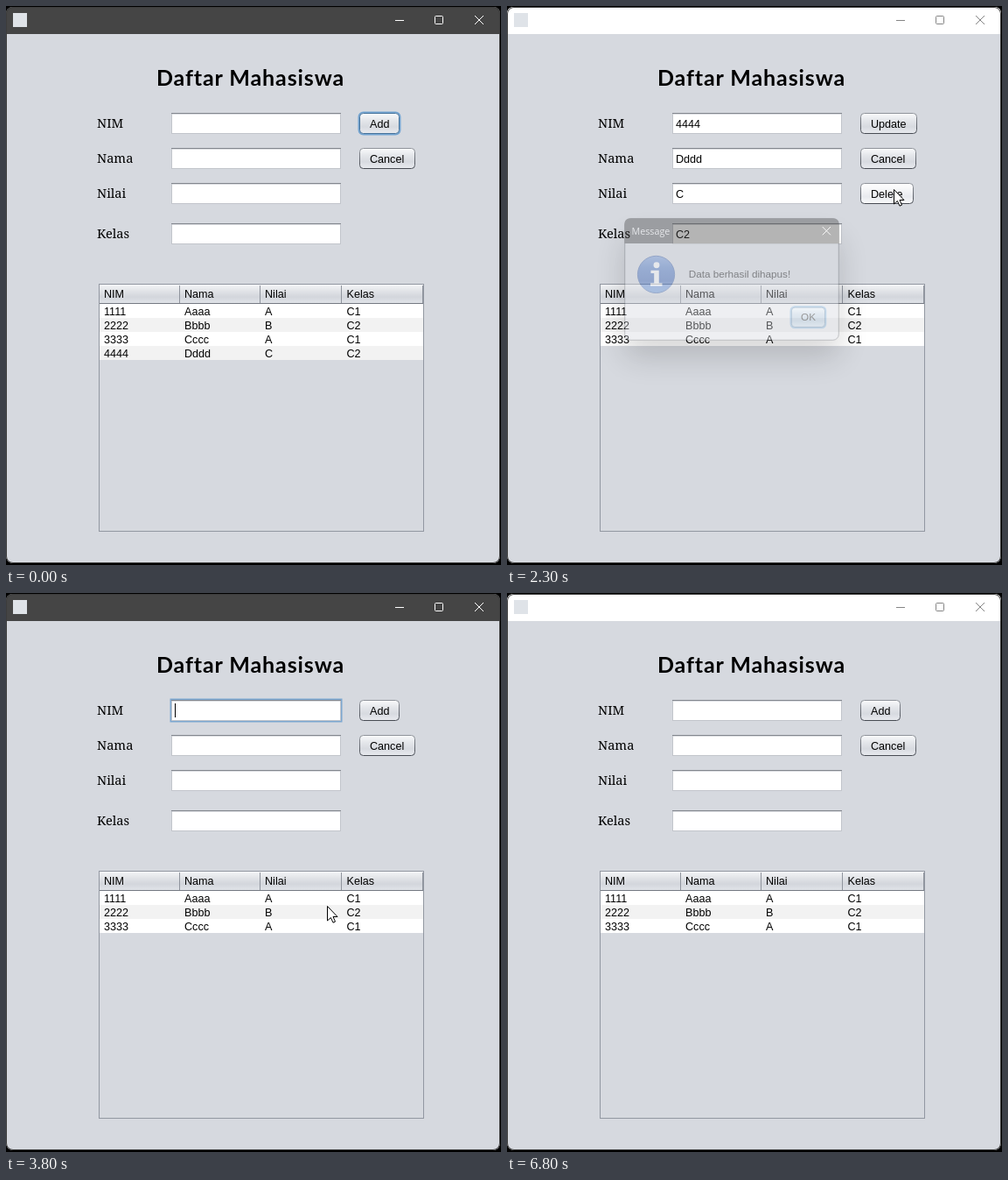
Animation of 566 by 638 pixels, one loop 7 s. Source, as an HTML page:

```html
<!DOCTYPE html>
<html lang="id">
<head>
<meta charset="utf-8">
<title>Daftar Mahasiswa</title>
<style>
  html, body { margin: 0; width: 100%; height: 100%; overflow: hidden; background: #000; }
  svg { display: block; }
  text { font: 12.6px "Liberation Sans", Arial, sans-serif; fill: #000; white-space: pre; }
  .title { font: 700 25px Lato, "Open Sans", sans-serif; letter-spacing: .9px; }
  .label { font: 14.6px "Noto Serif", serif; }
  .caption { font: 11.5px "Open Sans", sans-serif; fill: #fff; }
  .line { fill: none; stroke-width: 1; }
</style>
</head>
<body>
<svg id="stage" width="566" height="638" viewBox="0 0 566 638"></svg>
<script>
const LOOP = 7000, STEP = 100;

// Pointer path: time, x, y (no position hides it)
const PATH = [
  [0], [100, 464, 407], [200, 425, 405], [300, 370, 402], [400, 312, 398],
  [500, 268, 396], [600, 262, 396], [700, 266, 396], [800, 272, 396],
  [1000, 364, 371], [1100, 402, 318], [1200, 432, 254], [1300, 444, 207],
  [1400, 446, 184], [1500, 445, 192], [1600, 443, 204], [1700, 442, 208],
  [1800, 442, 209], [2800, 438, 222], [2900, 424, 260], [3000, 404, 310],
  [3100, 388, 342], [3200, 378, 353], [3300, 368, 357], [3400, 367, 357],
  [5400, 379, 354], [6000, 500, 530], [6100]
];

// Dialog: time, opacity, scale
const DIALOG = [[0, 0, 1], [2300, .4, .93], [2400, .85, .98], [2500, 1, 1], [3600, .5, .95], [3700, 0, 1]];

const STUDENTS = [
  ['1111', 'Aaaa', 'A', 'C1'], ['2222', 'Bbbb', 'B', 'C2'],
  ['3333', 'Cccc', 'A', 'C1'], ['4444', 'Dddd', 'C', 'C2']
];
const HEADS = ['NIM', 'Nama', 'Nilai', 'Kelas'];
const COLS = [107, 199, 291, 384, 477];
const TEXT_X = [112, 204, 296, 389.5];
const FIELD_Y = [122, 162, 202, 248];

const at = (table, t) => table.filter(row => row[0] <= t).pop();
const within = (t, a, b) => t >= a && t < b;

const rect = (x, y, w, h, fill, more = '') =>
  `<rect x="${x}" y="${y}" width="${w}" height="${h}" fill="${fill}" ${more}/>`;
const text = (x, y, s, more = '') => `<text x="${x}" y="${y}" ${more}>${s}</text>`;
const path = (d, color, more = '') => `<path d="${d}" class="line" stroke="${color}" ${more}/>`;
const gradient = (id, ...colors) =>
  `<linearGradient id="${id}" x2="0" y2="1">${colors.map((c, i) =>
    `<stop offset="${i / (colors.length - 1)}" stop-color="${c}"/>`).join('')}</linearGradient>`;

const DEFS = `<defs>
  ${gradient('normal', '#fafbfc', '#e5e7eb', '#d7dae0', '#e9ebef')}
  ${gradient('hover', '#ffffff', '#f4f5f7', '#e8eaee', '#fafbfc')}
  ${gradient('pressed', '#b4b8c5', '#a4a9b9', '#9da3b5', '#bdc2cf')}
  ${gradient('default', '#dfe8f1', '#b6c9dc', '#9fb8d0', '#c4d8e9')}
  ${gradient('defaultDown', '#7891ad', '#5d7f9f', '#527899', '#7197b8')}
  ${gradient('edge', '#90949b', '#474b53')}
  ${gradient('head', '#f4f5f7', '#e2e4e8', '#d3d6dc', '#e0e3e8')}
  ${gradient('headHover', '#fdfdfe', '#f1f3f6', '#e5e8ed', '#eff1f4')}
  ${gradient('info', '#6a92d8', '#3d6cc0', '#2c58b0', '#5a90da')}
  <filter id="shadow" x="-40%" y="-60%" width="180%" height="220%">
    <feGaussianBlur stdDeviation="19"/></filter>
</defs>`;

function titleBar(active) {
  const bar = active ? '#454545' : '#fff', ink = active ? '#fff' : '#858585';
  return `<path d="M0 32V9Q0 1 8 1H557Q565 1 565 9V32Z" fill="${bar}"/>` +
    rect(8, 8, 16, 16, '#dfe3e8') +
    path('M445 16.5H455', ink) +
    path('M491.5 11.5H498.5Q499.5 11.5 499.5 12.5V19.5Q499.5 20.5 498.5 20.5H491.5Q490.5 20.5 490.5 19.5V12.5Q490.5 11.5 491.5 11.5Z', ink) +
    path('M536 11L546 21M546 11L536 21', ink);
}

function button(x, y, w, h, label, look = 'normal', focus = false) {
  const ring = focus ? rect(x - .5, y - .5, w + 1, h + 1, 'none', 'rx="5" stroke="#73a4d1" stroke-width="2"') : '';
  const edge = look === 'pressed' ? '#3b3f4b' : focus ? '#48749c' : 'url(#edge)';
  return ring + rect(x + .5, y + .5, w - 1, h - 1, `url(#${look})`, `rx="4" stroke="${edge}"`) +
    text(x + 12, y + 17, label);
}

function field(y, value, focus) {
  const ring = focus ? rect(189, y, 194, 24, 'none', 'stroke="#7da7d0" stroke-width="3"') : '';
  return ring + rect(189.5, y + .5, 193, 23, '#fff', 'stroke="#c2c5cb"') +
    path(`M189 ${y + .5}H383`, '#83878e') + path(`M190 ${y + 1.5}H382`, '#dcdee2') +
    text(193, y + 17, value);
}

function table(s) {
  let out = '';
  HEADS.forEach((name, i) => {
    const x = COLS[i], w = COLS[i + 1] - x;
    out += rect(x, 318, w, 21, s.headHover && i === 3 ? 'url(#headHover)' : 'url(#head)') +
      path(`M${x + w - .5} 319V339`, '#8f949d') + text(TEXT_X[i], 333, name);
  });
  out += path('M107 339.5H477', '#747982');
  STUDENTS.slice(0, s.rows).forEach((row, r) => {
    const y = 340 + r * 16, chosen = s.selected && r === 3;
    out += rect(107, y, 370, 16, chosen ? '#39698a' : r % 2 ? '#f2f2f2' : '#fff');
    if (chosen && s.cell) out += rect(199.5, y + .5, 92, 15, 'none', 'stroke="#73a4d1"');
    row.forEach((v, i) => out += text(TEXT_X[i], y + 13, v, chosen ? 'style="fill:#fff"' : ''));
  });
  return out + rect(106.5, 317.5, 371, 282, 'none', 'stroke="#9297a1"');
}

function dialog(opacity, scale, okLook) {
  if (!opacity) return '';
  return `<g opacity="${opacity}" transform="translate(257 312) scale(${scale}) translate(-257 -312)">` +
    rect(125, 262, 264, 146, '#000', 'rx="8" opacity=".38" filter="url(#shadow)"') +
    rect(125.5, 237.5, 263, 149, '#d6d9df', 'rx="7" stroke="#555a61"') +
    '<path d="M125 268V245Q125 237 133 237H381Q389 237 389 245V268Z" fill="#454545"/>' +
    text(134, 257, 'Message', 'class="caption"') +
    path('M368.5 247.5L378.5 257.5M378.5 247.5L368.5 257.5', '#fff') +
    '<circle cx="164" cy="306" r="22.7" fill="url(#info)" stroke="#2a529f"/>' +
    '<circle cx="164.5" cy="294.5" r="3.7" fill="#fff"/>' +
    '<path d="M157.500 301H167.500V316.500H171.500V320H157V316.500H161.500V304.500H157.500Z" fill="#fff"/>' +
    text(204, 310, 'Data berhasil dihapus!') +
    button(330, 346, 42, 25, 'OK', okLook, true) + '</g>';
}

const pointer = (x, y) => x === undefined ? '' :
  `<path transform="translate(${x + .5} ${y + .5})" d="M0 0V16.500L3.900 13 6.500 18.700 9 17.600 6.500 12H11.500Z" fill="#fff" stroke="#000"/>`;

function scene(t) {
  const filled = within(t, 700, 3600), inactive = within(t, 2300, 3600) || t >= 6800;
  const focusNim = within(t, 3700, 6800);
  const caret = within(t, 3700, 4300) || within(t, 4800, 5300) || within(t, 5800, 6400);
  const [, opacity, scale] = at(DIALOG, t);
  const [, x, y] = at(PATH, t);

  const down = within(t, 1900, 2300);
  const deleteLook = down ? 'pressed' :
    within(t, 1300, 1400) || within(t, 1600, 3600) ? 'hover' : 'normal';
  const cancelLook = within(t, 1400, 1500) ? 'hover' : 'normal';
  const okLook = within(t, 3400, 3600) ? 'defaultDown' : 'default';

  let out = DEFS + rect(0, 1, 565, 635, '#d6d9df', 'rx="8"') + titleBar(!inactive) +
    rect(.5, 1.5, 564, 634, 'none', 'rx="7.5" stroke="#3c3c3c"') +
    text(172, 91, 'Daftar Mahasiswa', 'class="title"');
  FIELD_Y.forEach((fy, i) => {
    out += text(104, fy + 17, HEADS[i], 'class="label"') +
      field(fy, filled ? STUDENTS[3][i] : '', focusNim && i === 0);
  });
  if (caret) out += rect(193, 126, 1, 16, '#000');

  out += filled ? button(404, 122, 65, 24, 'Update') : button(404, 122, 46, 24, 'Add', 'normal', t < 600);
  out += button(404, 162, 64, 24, 'Cancel', cancelLook);
  if (filled) out += button(404, 202, 61, 24, 'Delete', deleteLook, down);

  out += table({
    rows: t < 2300 ? 4 : 3,
    selected: within(t, 600, 2300),
    cell: t < 1900,
    headHover: within(t, 1000, 1200)
  });
  return out + dialog(opacity, scale, okLook) + pointer(x, y);
}

const stage = document.getElementById('stage');
const start = performance.now();
let shown = -1;

function tick() {
  const t = Math.floor((performance.now() - start) % LOOP / STEP) * STEP;
  if (t !== shown) stage.innerHTML = scene(shown = t);
  requestAnimationFrame(tick);
}
tick();
</script>
</body>
</html>
```
